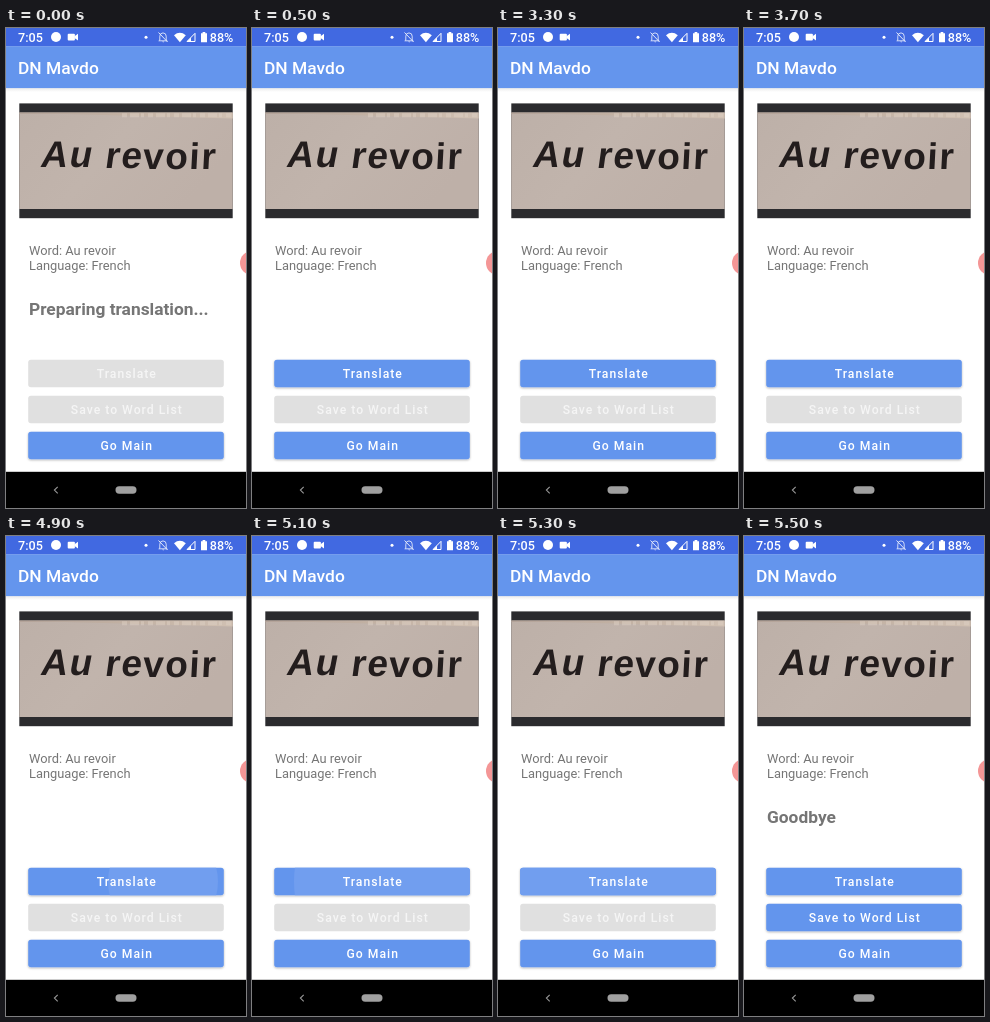
Write an HTML page that moves like this. It is 240 px wide and 480 px high and loops after 8 s.

```html
<!DOCTYPE html>
<html lang="en">
<head>
<meta charset="utf-8">
<title>Word translation</title>
<style>
  html, body { margin: 0; width: 100%; height: 100%; overflow: hidden; background: #fff; }
  svg { display: block; width: 100%; height: 100%; }
  text { font-family: Roboto, sans-serif; white-space: pre; }
  .status { font-size: 12.6px; font-weight: 500; }
  .sign text { font: bold 37px "Liberation Sans", Arial, sans-serif; letter-spacing: 1.6px; fill: #231d1d; }
  .body { font-size: 12.85px; fill: #757575; }
  .result { font-size: 17.35px; font-weight: 700; fill: #757575; }
  .button text { font-size: 12.2px; font-weight: 500; letter-spacing: 1px; text-anchor: middle; }
</style>
</head>
<body>
<svg viewBox="0 0 240 480">
  <defs>
    <linearGradient id="paper" x2="1" y2="0.4">
      <stop offset="0" stop-color="#bdb0a8"/>
      <stop offset="0.5" stop-color="#c1b4ac"/>
      <stop offset="1" stop-color="#beb0a8"/>
    </linearGradient>
    <linearGradient id="edge">
      <stop offset="0" stop-color="#b3a399"/>
      <stop offset="0.5" stop-color="#c2b1a3"/>
      <stop offset="1" stop-color="#d0c0b2"/>
    </linearGradient>
    <linearGradient id="fade" x2="0" y2="1">
      <stop offset="0" stop-opacity="0.08"/>
      <stop offset="1" stop-opacity="0"/>
    </linearGradient>
    <filter id="shadow" x="-5%" y="-20%" width="110%" height="150%">
      <feDropShadow dx="0" dy="0.9" stdDeviation="0.9" flood-color="#000" flood-opacity="0.3"/>
    </filter>
    <clipPath id="face"><rect x="22.2" y="331.7" width="195.6" height="27.6" rx="2.8"/></clipPath>
  </defs>

  <rect width="240" height="480" fill="#fff"/>

  <!-- Status bar -->
  <rect width="240" height="18.5" fill="#4169e1"/>
  <g fill="#fff">
    <text class="status" x="12" y="13.7">7:05</text>
    <circle cx="50" cy="9" r="5"/>
    <rect x="61.7" y="5.8" width="7.2" height="6.8" rx="1"/>
    <path d="M68.5 8.3 72 5.8v6.8l-3.5-2.5z"/>
    <circle cx="140" cy="9.3" r="1.5"/>
    <g opacity="0.85">
      <path d="M153.8 12V8.2q0-3.1 3.2-3.3 3.2.2 3.2 3.3V12l1 .8h-8.4z" fill="none" stroke="#fff" stroke-width="0.9"/>
      <path d="M156 13.5h2.3l-1.1 1z"/>
      <path d="M152.5 4.5 161.6 14" stroke="#fff"/>
    </g>
    <path d="M168 7.2q5.9-4.7 11.8 0L173.9 14.2z"/>
    <path d="M181 13.5 189 5.3v8.2z" fill="none" stroke="#fff"/>
    <path d="M181 13.5 185 9.5v4z"/>
    <path d="M195 5.2h1.6V4h2.7v1.2h1.7v9h-6z"/>
    <text class="status" x="203.8" y="13.7">88%</text>
  </g>

  <!-- App bar -->
  <rect y="60" width="240" height="4" fill="url(#fade)"/>
  <rect y="18.3" width="240" height="41.8" fill="#6495ed"/>
  <text x="12" y="46" font-size="17.4" font-weight="500" fill="#fff">DN Mavdo</text>

  <!-- Photographed sign -->
  <g class="sign">
    <rect x="13.3" y="75.4" width="213.4" height="114.8" fill="#2b2b2e"/>
    <path d="M13.3 84.5H226.7V181H13.3z" fill="url(#paper)"/>
    <path d="M13.3 84.5H226.7V90.5L60 86H13.3z" fill="url(#edge)"/>
    <path d="M116 87.3H226.7" stroke="#ddd0c4" stroke-width="4" stroke-dasharray="5 3 9 2 3 4" opacity="0.5"/>
    <text transform="translate(33.5 138.5) skewX(-11)">Au</text>
    <text transform="translate(98 140) skewX(-8)">re</text>
    <text transform="translate(136.5 141) skewX(-3)">voir</text>
  </g>

  <text class="body" x="23" y="227">Word: Au revoir</text>
  <text class="body" x="23" y="242">Language: French</text>
  <text class="result" id="result" x="23" y="286.5"></text>

  <g id="buttons"></g>
  <circle cx="246" cy="235" r="12" fill="#f49696"/>

  <!-- Navigation bar -->
  <rect y="443.8" width="240" height="36.2" fill="#000"/>
  <path d="M51.7 458.8 48.4 462.1 51.7 465.4" fill="none" stroke="#999" stroke-width="1.1"/>
  <rect x="109.5" y="458.3" width="21" height="7.4" rx="3.7" fill="#a0a0a0"/>
</svg>
<script>
const LOOP = 8000, READY = 500, PRESS = 4900, DONE = 5500, STEP = 200;
const BLUE = "#6495ed", LIT = "#719eef", GREY = "#e0e0e0";

function add(parent, tag, attrs, text = "") {
  const node = document.createElementNS("http://www.w3.org/2000/svg", tag);
  for (const [key, value] of Object.entries(attrs)) node.setAttribute(key, value);
  node.textContent = text;
  return parent.appendChild(node);
}

const result = document.getElementById("result");
const group = document.getElementById("buttons");

function makeButton(label, y) {
  const g = add(group, "g", { class: "button" });
  const face = add(g, "rect", { x: 22.2, y: y - 0.3, width: 195.6, height: 27.6, rx: 2.8 });
  const ripple = add(g, "circle", { cx: 157, cy: y + 13.5, r: 0, fill: LIT, "clip-path": "url(#face)" });
  const text = add(g, "text", { x: 120.8, y: y + 18.1 }, label);
  return {
    ripple,
    enable(on) {
      face.setAttribute("fill", on ? BLUE : GREY);
      face.setAttribute("filter", on ? "url(#shadow)" : "none");
      text.setAttribute("fill", on ? "#fff" : "#f5f5f5");
    }
  };
}

const translate = makeButton("Translate", 332);
const save = makeButton("Save to Word List", 368);
makeButton("Go Main", 404).enable(true);

function rippleRadius(t) {
  if (t < PRESS || t >= DONE) return 0;
  return 55 + 60 * Math.floor((t - PRESS) / STEP);
}

function draw(t) {
  result.textContent = t < READY ? "Preparing translation..." : t >= DONE ? "Goodbye" : "";
  translate.enable(t >= READY);
  translate.ripple.setAttribute("r", rippleRadius(t));
  save.enable(t >= DONE);
}

const start = performance.now();
function tick() {
  draw((performance.now() - start) % LOOP);
  requestAnimationFrame(tick);
}
tick();
</script>
</body>
</html>
```
